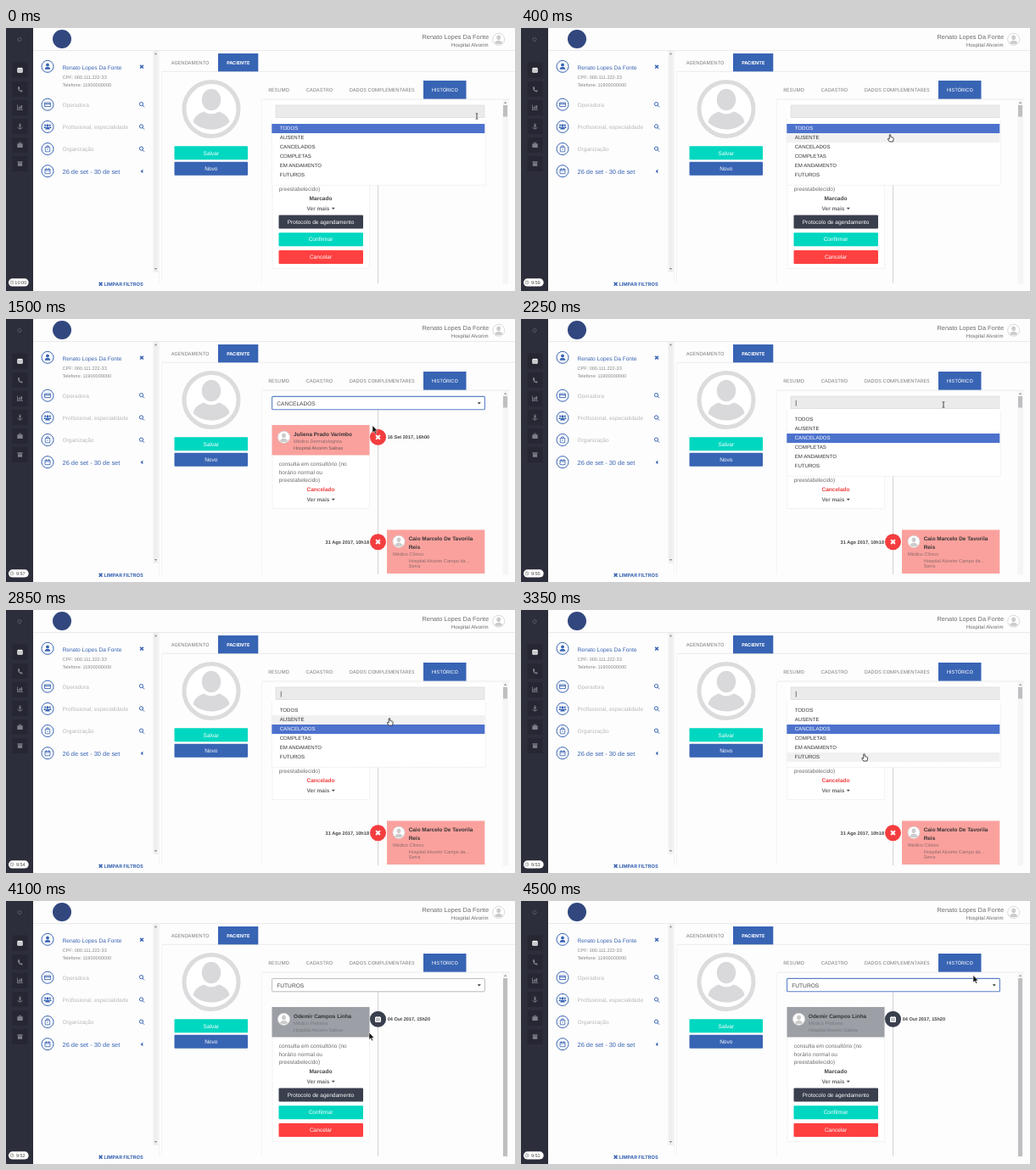
An HTML page that plays this animation: 600x310 px, repeating every 4.55 s.

```html
<!DOCTYPE html>
<html lang="pt-BR">
<head>
<meta charset="utf-8">
<title>Histórico do paciente</title>
<style>
html, body { margin: 0; width: 100%; height: 100%; overflow: hidden; background: #fdfdfd; }
svg { display: block; width: 600px; height: 310px; }
text { font-family: "Liberation Sans", Arial, sans-serif; font-size: 6.55px; fill: #6c6c6c; text-rendering: geometricPrecision; }
.b { font-weight: bold; }
.caps { font-family: Inter, sans-serif; font-size: 5.75px; fill: #808080; }
.w { fill: #fff; }
.blue { fill: #3864b4; }
.mute { fill: #b8b8bc; }
.sm { font-size: 5.55px; }
.pale { fill: #858585; }
.mid { text-anchor: middle; }
.end { text-anchor: end; }
.name { font-weight: bold; font-size: 6.4px; fill: #333; }
.date { font-weight: bold; font-size: 5.6px; fill: #444; }
.opt { font-size: 6.1px; fill: #333; }
.line { fill: none; stroke: #e6e6e8; stroke-width: .8; }
.faint { stroke: #f2f2f3; }
.ico { fill: none; stroke: #3864b4; stroke-width: 1; }
.side { fill: #7d7f8a; }
</style>
</head>
<body>
<svg viewBox="0 0 600 310">
<defs>
  <g id="person">
    <circle r="7" fill="#fff" stroke="#d5d5d5" stroke-width=".9"/>
    <ellipse cy="-2" rx="2.4" ry="2.8" fill="#ccc"/>
    <path d="M-4.5 4.6Q-4 1.6 0 1.4Q4 1.6 4.5 4.6Q0 7 -4.5 4.6Z" fill="#ccc"/>
  </g>
  <path id="x" d="M-1.9 -1.9L1.9 1.9M1.9 -1.9L-1.9 1.9" stroke-width="1.6"/>
  <g id="lens" class="ico" stroke-width="1.3"><circle cx="-.5" cy="-.6" r="2.1"/><path d="M1 1L3 3"/></g>
  <g id="cal"><path d="M-3 -2.2H3V3H-3Z"/><path d="M-1.5 -3.3V-1.6M1.5 -3.3V-1.6" stroke-width="1"/></g>
  <g id="cancel"><circle r="9.5" fill="#f43d3f"/><use href="#x" stroke="#fff" transform="scale(1.25)"/></g>
  <rect id="tile" x="-9" y="-9" width="18" height="18" fill="#262733"/>
</defs>

<rect width="600" height="310" fill="#fdfdfd"/>

<!-- sidebar -->
<rect width="32" height="310" fill="#2d2e3b"/>
<use href="#tile" x="16.5" y="49.5"/><use href="#tile" x="16.5" y="72"/><use href="#tile" x="16.5" y="94"/>
<use href="#tile" x="16.5" y="116"/><use href="#tile" x="16.5" y="138"/><use href="#tile" x="16.5" y="160"/>
<circle cx="16" cy="13.5" r="2" fill="none" stroke="#747682" stroke-width="1" stroke-dasharray="1.1 .5"/>
<use href="#cal" transform="translate(16.5 49.5) scale(.9)" fill="#fff" stroke="#fff"/>
<path d="M14 49H19M14 51H19" stroke="#262733" stroke-width=".5"/>
<path class="side" d="M14.1 69.3L15.5 69L16.5 71.2L15.7 72Q16.3 73.3 17.5 73.8L18.3 73L19.7 74.2L19.2 75.3Q16.5 75.8 14.7 73.3Q13.5 71.3 14.1 69.3Z"/>
<path class="side" d="M13 90.5H13.8V96.2H20V97H13ZM14.5 93H15.7V95.6H14.5ZM16.2 91.8H17.4V95.6H16.2ZM17.9 91H19.1V95.6H17.9Z"/>
<g fill="none" stroke="#7d7f8a" stroke-width=".9"><circle cx="16.5" cy="113.8" r=".9"/><path d="M16.5 114.6V118.8M15 115.6H18M13.8 116.8Q14.5 119 16.5 119Q18.5 119 19.2 116.8"/></g>
<path class="side" d="M13.3 136.2H19.7V141H13.3ZM15 136.2V134.8H18V136.2H17.3V135.4H15.7V136.2Z"/>
<path class="side" d="M13.5 157.2H19.5V158.7H13.5ZM13.9 159.2H19.1V162.8H13.9Z"/>
<rect x="3" y="295.3" width="23.7" height="9.2" rx="4.6" fill="#fff"/>
<circle cx="7" cy="299.9" r="2" fill="none" stroke="#777" stroke-width=".6"/>
<path d="M7 298.7V300H8" fill="none" stroke="#777" stroke-width=".5"/>
<text id="timer" x="17.3" y="302" class="sm mid" style="fill:#444">10:00</text>

<!-- header -->
<circle cx="66" cy="13" r="11" fill="#31477e"/>
<path class="line" d="M32 26.5H600"/>
<text x="569" y="13.2" class="end" style="font-size:7.4px">Renato Lopes Da Fonte</text>
<text x="568.5" y="22.4" class="end" style="font-size:6.1px">Hospital Alvorim</text>
<use href="#person" x="580.7" y="13.3"/>

<!-- filters -->
<path class="line faint" d="M180.5 27V301"/>
<rect x="173.5" y="27" width="6" height="261" fill="#efeff0"/>
<path d="M175 31.2L176.5 29L178 31.2ZM175 283L176.5 285.2L178 283Z" fill="#888"/>
<g class="ico">
  <circle cx="49" cy="45.3" r="7"/><circle cx="49" cy="90.2" r="7"/><circle cx="49" cy="116.4" r="7"/><circle cx="49" cy="142.5" r="7"/><circle cx="49" cy="168.7" r="7"/>
  <path d="M45.6 88H52.4V92.6H45.6ZM45.6 89.6H52.4" stroke-width=".9"/>
  <path d="M46.3 145.8V140.5H51.7V145.8ZM47.8 140.3V138.9H50.2V140.3M48.2 143H49.8" stroke-width=".8"/>
  <use href="#cal" x="49" y="168.7" stroke-width=".8"/>
  <path d="M46 168H52" stroke-width=".8"/>
</g>
<g class="blue">
  <circle cx="49" cy="43.4" r="1.9"/><path d="M45.7 48.8Q45.8 45.8 49 45.7Q52.2 45.8 52.3 48.8Z"/>
  <circle cx="49" cy="114.8" r="1.5"/><circle cx="46.2" cy="114.6" r="1.1"/><circle cx="51.8" cy="114.6" r="1.1"/>
  <path d="M46.3 119.6Q46.4 116.8 49 116.6Q51.6 116.8 51.7 119.6ZM44.4 118Q44.4 116 46.6 116V118ZM53.6 118Q53.6 116 51.4 116V118Z"/>
  <path d="M161.3 166.6V171.3L158.6 169Z"/>
</g>
<use href="#x" x="160" y="45.6" stroke="#3864b4"/>
<use href="#lens" x="160" y="90.2"/><use href="#lens" x="160" y="116.5"/><use href="#lens" x="160" y="142.7"/>
<g transform="translate(0 .4)">
  <text x="66.5" y="48.3" class="blue" style="font-size:6.6px">Renato Lopes Da Fonte</text>
  <text x="66.5" y="59.6" class="sm pale">CPF: 000.111.222-33</text>
  <text x="66.5" y="68.4" class="sm pale">Telefone: 11900000000</text>
  <text x="66.5" y="92.5" class="mute">Operadora</text>
  <text x="66.5" y="118.8" class="mute">Profissional, especialidade</text>
  <text x="66.5" y="145" class="mute">Organização</text>
  <text x="66.5" y="171.4" class="blue" style="font-size:7.45px">26 de set - 30 de set</text>
</g>
<use href="#x" x="111.6" y="301.8" stroke="#3864b4"/>
<text x="115.4" y="303.9" class="caps b blue">LIMPAR FILTROS</text>

<!-- patient -->
<path class="line" d="M184 51.3H600"/>
<path class="line faint" d="M183.5 51V301"/>
<rect x="250" y="30" width="47.3" height="21.3" class="blue"/>
<text x="194.8" y="43" class="caps">AGENDAMENTO</text>
<text x="273.7" y="43" class="caps b w mid" style="font-size:5.5px">PACIENTE</text>
<circle cx="242" cy="95.5" r="32" fill="#fff" stroke="#dcdcde" stroke-width="5"/>
<ellipse cx="242" cy="84.5" rx="11.2" ry="12.8" fill="#d9d9dc"/>
<path d="M220.5 111Q222 102.5 233 98.5Q242 104 251 98.5Q262 102.5 263.5 111Q255 119.5 242 119.5Q229 119.5 220.5 111Z" fill="#d9d9dc"/>
<rect x="198.5" y="139.2" width="86.5" height="16" rx="1" fill="#00d7c0"/>
<rect x="198.5" y="157.8" width="86.5" height="16" rx="1" class="blue"/>
<text x="241.8" y="149.5" class="w mid">Salvar</text>
<text x="241.8" y="168.1" class="w mid">Novo</text>

<!-- inner tabs -->
<path class="line" d="M302 84H594"/>
<path class="line faint" d="M301.5 84V301"/>
<rect x="492" y="62" width="50.5" height="21.6" class="blue"/>
<text x="309.3" y="75" class="caps">RESUMO</text>
<text x="353.7" y="75" class="caps">CADASTRO</text>
<text x="404.7" y="75" class="caps">DADOS COMPLEMENTARES</text>
<text x="517.3" y="75" class="caps w mid">HISTÓRICO</text>
<rect x="585.5" y="84.5" width="6.5" height="217" fill="#f5f5f6"/>
<path d="M587 89L588.6 86.8L590.2 89Z" fill="#999"/>
<rect id="thumb" x="586" y="91" width="5" height="13.5" fill="#bfbfc1"/>

<path d="M438.6 107V301" stroke="#cdcdd0" stroke-width=".9"/>

<!-- scheduled appointment -->
<g id="future">
  <rect x="314" y="125" width="114.5" height="158.5" class="line" style="fill:#fff" stroke-dasharray="1.5 1"/>
  <rect x="313.5" y="125" width="115" height="35.5" fill="#9c9fa5"/>
  <use href="#person" x="327.5" y="139.3"/>
  <text x="339" y="138" class="name">Odemir Campos Linha</text>
  <text x="339" y="145.6" class="sm" style="fill:#777a80">Médico Pediatra</text>
  <text x="339" y="153.6" class="sm" style="fill:#777a80">Hospital Alvorim Saibas</text>
  <circle cx="438.5" cy="139.3" r="9.5" fill="#3a3f4e"/>
  <use href="#cal" x="438.5" y="139.3" fill="#fff" stroke="#fff"/>
  <path d="M436 138.9H441M436 140.8H441" stroke="#3a3f4e" stroke-width=".6"/>
  <text x="449.7" y="141.3" class="date">04 Out 2017, 15h20</text>
  <text x="371" y="203.4" class="b mid" style="fill:#444">Marcado</text>
  <rect x="321.5" y="220.5" width="99.5" height="16" rx="1" fill="#3a3f4e"/>
  <rect x="321.5" y="241.2" width="99.5" height="16" rx="1" fill="#00d7c0"/>
  <rect x="321.5" y="262" width="99.5" height="16" rx="1" fill="#ff4040"/>
  <text x="371" y="230.6" class="w mid">Protocolo de agendamento</text>
  <text x="371" y="251.3" class="w mid">Confirmar</text>
  <text x="371" y="272.2" class="w mid">Cancelar</text>
</g>

<!-- cancelled appointments -->
<g id="cancelled">
  <rect x="314" y="125" width="114.5" height="98.5" class="line" style="fill:#fff" stroke-dasharray="1.5 1"/>
  <rect x="313.5" y="125" width="115" height="35.5" fill="#faa19d"/>
  <use href="#person" x="327.5" y="139.3"/>
  <text x="339" y="138" class="name">Juliena Prado Varimbo</text>
  <text x="339" y="145.6" class="sm" style="fill:#8c6a6c">Médico Dermatologista</text>
  <text x="339" y="153.6" class="sm" style="fill:#6f5658">Hospital Alvorim Saibas</text>
  <use href="#cancel" x="438.5" y="139.3"/>
  <text x="449.7" y="141.3" class="date">16 Set 2017, 16h00</text>
  <text x="371" y="203.4" class="b mid" style="fill:#f43d3f">Cancelado</text>
  <text x="428" y="264.6" class="date end">31 Ago 2017, 10h18</text>
  <use href="#cancel" x="438.5" y="262.7"/>
  <rect x="449" y="248.5" width="115.3" height="51.5" fill="#faa19d"/>
  <use href="#person" x="463" y="262.3"/>
  <text x="474.7" y="261.3" class="name">Caio Marcelo De Tavorila</text>
  <text x="474.7" y="271.3" class="name">Reis</text>
  <text x="456" y="278.8" class="sm" style="fill:#8c6a6c">Médico Clínico</text>
  <text x="474.7" y="287" class="sm" style="fill:#8c6a6c">Hospital Alvorim Campo da ..</text>
  <text x="474.7" y="293.2" class="sm" style="fill:#8c6a6c">Serra</text>
</g>

<text x="321.7" y="173.4">consulta em consultório (no</text>
<text x="321.7" y="183">horário normal ou</text>
<text x="321.7" y="192.3">preestabelecido)</text>
<text x="354.5" y="215.2" class="b">Ver mais</text>
<path d="M383.8 211.8H387.8L385.8 214Z" fill="#444"/>

<g id="closed">
  <rect id="frame" x="313.6" y="91.4" width="250.8" height="15.4" rx="1" fill="#fff"/>
  <text id="choice" x="319.3" y="101.5" style="fill:#444;font-size:6.6px"></text>
  <path d="M555.8 98.3H559.8L557.8 100.5Z" fill="#333"/>
</g>

<g id="open">
  <rect x="313" y="87.5" width="252.5" height="97.5" fill="#fff"/>
  <path class="line" d="M313.3 107.5V185.3H565.2V107.5" stroke-dasharray="1.5 1"/>
  <rect id="field" x="318" y="91" width="246" height="14.6"/>
  <path id="caret" d="M324.3 95.8V102.6" stroke="#555" stroke-width=".8"/>
  <rect id="hover" x="313.3" width="251" height="11" fill="#f1f1f2"/>
  <rect id="picked" x="313.3" width="251" height="11" fill="#4c72cc"/>
  <g id="options"></g>
</g>

<g id="pointer">
  <path d="M0 0V8.6L2 6.8L3.4 9.8L4.7 9.2L3.4 6.3H6Z" fill="#111" stroke="#fff" stroke-width=".5"/>
  <path d="M-1.3 -3.3Q0 -3.3 0 -2.6Q0 -3.3 1.3 -3.3M0 -2.6V2.6M-1.3 3.3Q0 3.3 0 2.6Q0 3.3 1.3 3.3" fill="none" stroke="#222" stroke-width=".8"/>
  <path d="M-.8 0Q0 -1.2 .8 0V2.6L3.6 3.3Q4.4 3.6 4.2 4.8L3.5 8H-.7L-2.8 5Q-2.8 3.8 -.8 5Z" fill="#fff" stroke="#222" stroke-width=".8"/>
</g>
</svg>

<script>
const LOOP = 4550, STEP = 50, ROW = 11, TOP = 113;
const labels = ['TODOS', 'AUSENTE', 'CANCELADOS', 'COMPLETAS', 'EM ANDAMENTO', 'FUTUROS'];
const $ = id => document.getElementById(id);
const set = (id, attrs) => { for (const k in attrs) $(id).setAttribute(k, attrs[k]); };
const show = (el, on) => { el.style.display = on ? '' : 'none'; };

// time, x, y of the mouse
const path = [
  [0, 555, 104], [50, 555, 104], [550, 402, 132], [750, 388.5, 142],
  [1450, 388.5, 142], [1500, 432, 125.5], [1700, 498, 101],
  [2250, 498, 101], [2750, 452, 128], [2850, 452, 128],
  [3300, 404.5, 170], [3950, 404.5, 170], [4500, 533, 87.5]
];
// moments at which the countdown drops by one second
const ticks = [350, 700, 1200, 1700, 2250, 2750, 3350, 4000, 4450];

labels.forEach((label, i) => {
  const el = document.createElementNS('http://www.w3.org/2000/svg', 'text');
  el.setAttribute('class', 'opt');
  el.setAttribute('x', 322.7);
  el.setAttribute('y', TOP + i * ROW + 7.2);
  el.textContent = label;
  $('options').append(el);
});

function mouse(t) {
  const i = path.findIndex(p => p[0] > t);
  if (i < 0) return path[path.length - 1].slice(1);
  const [t0, x0, y0] = path[i - 1], [t1, x1, y1] = path[i];
  let k = (t - t0) / (t1 - t0);
  k = k * k * (3 - 2 * k);
  return [x0 + (x1 - x0) * k, y0 + (y1 - y0) * k];
}

function draw(t) {
  const [x, y] = mouse(t);
  const open = t < 1200 || (t >= 1900 && t < 3400);
  const picked = t < 1200 ? 0 : t < 3400 ? 2 : 5;
  const left = 600 - ticks.filter(m => m <= t).length;
  $('timer').textContent = Math.floor(left / 60) + ':' + String(left % 60).padStart(2, '0');

  show($('cancelled'), picked === 2);
  show($('future'), picked !== 2);
  set('thumb', { height: picked === 5 ? 210 : 13.5 });

  show($('open'), open);
  show($('closed'), !open);
  $('choice').textContent = labels[picked];
  const focus = t < 3400 || t >= 4250;
  set('frame', { stroke: focus ? '#5b80c8' : '#aaa', 'stroke-width': focus ? 1.1 : .8 });

  const plain = t >= 600 && t < 1200;
  set('field', { fill: plain ? '#fff' : '#ebebec', stroke: plain ? '#999' : '#dedee0', 'stroke-width': .8 });
  show($('caret'), t >= 1900);

  const row = Math.floor((y - TOP) / ROW);
  const over = open && row >= 0 && row < labels.length;
  show($('hover'), over);
  set('hover', { y: TOP + row * ROW });
  set('picked', { y: TOP + picked * ROW });
  [...$('options').children].forEach((el, i) => { el.style.fill = i === picked ? '#fff' : '#333'; });

  const shape = over ? 2 : open && y < 108 ? 1 : 0;
  [...$('pointer').children].forEach((el, i) => show(el, i === shape));
  set('pointer', { transform: `translate(${x} ${y})` });
}

const start = performance.now();
function tick() {
  const t = (performance.now() - start) % LOOP;
  draw(Math.floor(t / STEP) * STEP);
  requestAnimationFrame(tick);
}
tick();
</script>
</body>
</html>
```
